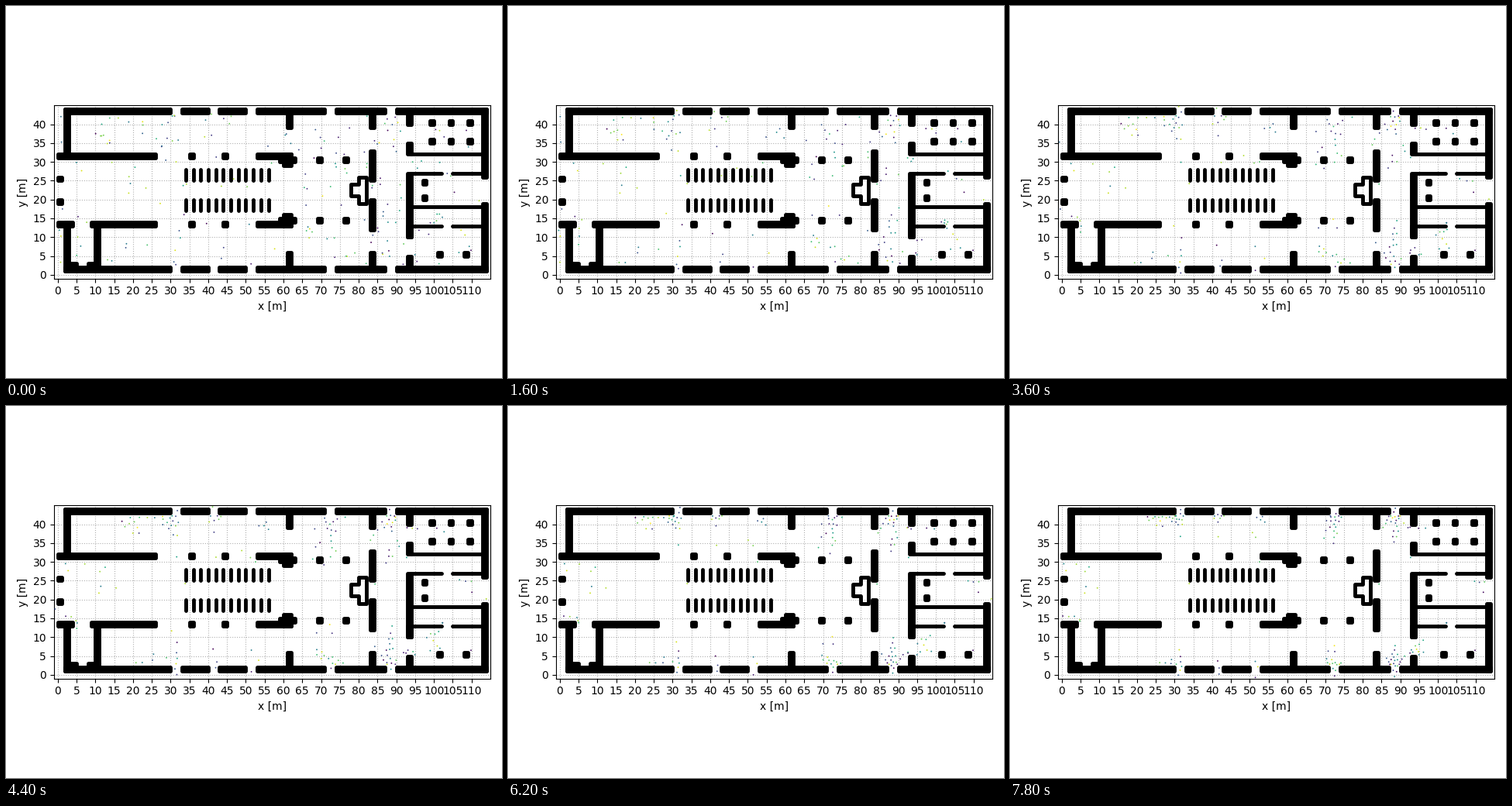
A matplotlib script for the animation above (8 s loop, 640 by 480 pixels).

```python
import numpy as np
import matplotlib.pyplot as plt
from matplotlib.animation import FuncAnimation
from matplotlib.patches import Rectangle, Polygon

FRAMES, INTERVAL = 40, 200
PEOPLE = 185
STEP = 0.36          # walking distance per frame, in metres
CELL = 0.5           # spacing of the distance field
X0, Y0 = -2, -2
TOP = 45             # the building mirrors about y = TOP / 2


def mirrored(x, y, w, h):
    return [(x, y, w, h), (x, TOP - y - h, w, h)]


def floor_plan():
    """Walls as (x, y, width, height); thin ones have a zero side."""
    walls = []
    start = 2
    for gap in (30, 40, 50, 71, 87, 114):
        walls += mirrored(start, 43, gap - start, 1)
        start = gap + 3

    # left wing
    walls += mirrored(2, 31, 1, 13) + mirrored(0, 25, 1, 1)
    walls += [(0, 31, 26, 1), (0, 13, 4, 1), (9, 13, 17, 1),
              (10, 2, 1, 12), (3, 2, 2, 1), (8, 2, 3, 1)]

    # hall
    for x in range(34, 57, 2):
        walls += mirrored(x, 25, 0, 3)
    for x in (35, 44):
        walls += mirrored(x, 31, 1, 1)
    for x in (69, 76):
        walls += mirrored(x, 30, 1, 1)
    for x in (61, 83):
        walls += mirrored(x, 39, 1, 5)
    walls += mirrored(53, 31, 9, 1) + mirrored(59, 30, 4, 1)
    walls += mirrored(60, 29, 2, 3) + mirrored(83, 25, 1, 8)

    # right wing
    walls += mirrored(93, 40, 1, 4) + mirrored(93, 32, 1, 3)
    walls += mirrored(113, 26, 1, 18)
    walls += [(93, 10, 1, 17), (94, 32, 19, 0), (94, 18, 19, 0)]
    for y in (13, 27):
        walls += [(94, y, 8, 0), (105, y, 8, 0)]
    walls += [(x, y, 1, 1) for x in (99, 104, 109) for y in (35, 40)]
    walls += [(97, y, 1, 1) for y in (20, 24)]
    walls += [(x, 5, 1, 1) for x in (101, 108)]
    return walls


WALLS = floor_plan()
COUNTER = [(80, 26), (82, 26), (82, 19), (80, 19),
           (80, 21), (78, 21), (78, 24), (80, 24)]


def distance_field():
    """Walking distance to the nearest way out, on a grid."""
    gx, gy = np.meshgrid(np.arange(X0, 116.1, CELL), np.arange(Y0, 46.1, CELL))
    solid = np.zeros(gx.shape, bool)
    for x, y, w, h in WALLS + [(78, 19, 4, 7)]:
        solid |= ((gx >= x - 0.5) & (gx <= x + w + 0.5)
                  & (gy >= y - 0.5) & (gy <= y + h + 0.5))
    outside = (gx <= -1) | (gx >= 115) | (gy <= -1) | (gy >= 45)
    dist = np.where(outside, 0.0, 1e3)
    moves = [(i, j) for i in (-1, 0, 1) for j in (-1, 0, 1) if i or j]
    while True:
        new = dist
        for i, j in moves:
            new = np.minimum(new, np.roll(dist, (i, j), (0, 1))
                             + CELL * np.hypot(i, j))
        new[solid] = 1e3
        if np.array_equal(new, dist):
            return dist
        dist = new


FIELD = distance_field()
angles = np.arange(24) * np.pi / 12
DIRS = np.column_stack([np.cos(angles), np.sin(angles)])


def exit_dist(p):
    col = np.rint((p[..., 0] - X0) / CELL).astype(int)
    row = np.rint((p[..., 1] - Y0) / CELL).astype(int)
    return FIELD[row.clip(0, FIELD.shape[0] - 1),
                 col.clip(0, FIELD.shape[1] - 1)]


def spawn(rng):
    """Scatter people over the rooms, fewer of them in the hall."""
    people = []
    while len(people) < PEOPLE:
        p = np.array([rng.uniform(0, 113), rng.uniform(2, 43)])
        in_hall = p[0] < 60 and 14 < p[1] < 31
        beside_hall = 33 < p[0] < 60
        chance = 0.2 if in_hall else 0.4 if beside_hall else 1
        if exit_dist(p) < 27 and rng.random() < chance:
            people.append(p)
    return np.array(people)


def walk(pos):
    """One step of everybody down the distance field, keeping apart."""
    here = exit_dist(pos)
    gain = (here[:, None] - exit_dist(pos[:, None] + DIRS)).clip(0) ** 4
    way = gain @ DIRS
    way /= np.linalg.norm(way, axis=1, keepdims=True) + 1e-9
    step = way * (STEP * (here / 12).clip(0.25, 1))[:, None]

    gap = pos[:, None] - pos
    r = np.linalg.norm(gap, axis=2) + 1e-6
    near = np.where((r < 1.6) & (r > 1e-3), 0.04 / r ** 2, 0)
    push = (gap * near[..., None]).sum(1).clip(-0.12, 0.12)

    def is_free(p):
        return (exit_dist(p) < 900)[:, None]

    alone = np.where(is_free(pos + step), pos + step, pos)
    pushed = pos + step + push
    return np.where(is_free(pushed), pushed, alone)


rng = np.random.default_rng(12)
shade = rng.random(PEOPLE)
track = [spawn(rng)]
for _ in range(FRAMES - 1):
    track.append(walk(track[-1]))

fig, ax = plt.subplots(figsize=(6.4, 4.8), dpi=100)
ax.set_aspect("equal")
ax.set_axisbelow(True)
ax.grid(linestyle=":")

WIDTH = 3.5
for x, y, w, h in WALLS:
    if w and h:
        ax.add_patch(Rectangle((x, y), w, h, color="black", linewidth=WIDTH,
                               joinstyle="round", zorder=2))
    else:
        ax.plot([x, x + w], [y, y + h], color="black", linewidth=WIDTH,
                solid_capstyle="round")
ax.add_patch(Polygon(COUNTER, fill=False, edgecolor="black", linewidth=WIDTH,
                     joinstyle="round", zorder=2))

dots = ax.scatter([], [], s=1.8, c=[], cmap="viridis", vmin=0, vmax=1,
                  linewidths=0, zorder=3)

ax.set(xlim=(-1, 115), ylim=(-1, 45), xlabel="x [m]", ylabel="y [m]",
       xticks=range(0, 111, 5), yticks=range(0, 41, 5))
fig.tight_layout()


def update(i):
    inside = exit_dist(track[i]) > 0.3
    dots.set_offsets(track[i][inside])
    dots.set_array(shade[inside])
    return dots,


anim = FuncAnimation(fig, update, frames=FRAMES, interval=INTERVAL,
                     repeat=True, repeat_delay=0)
plt.show()
```
